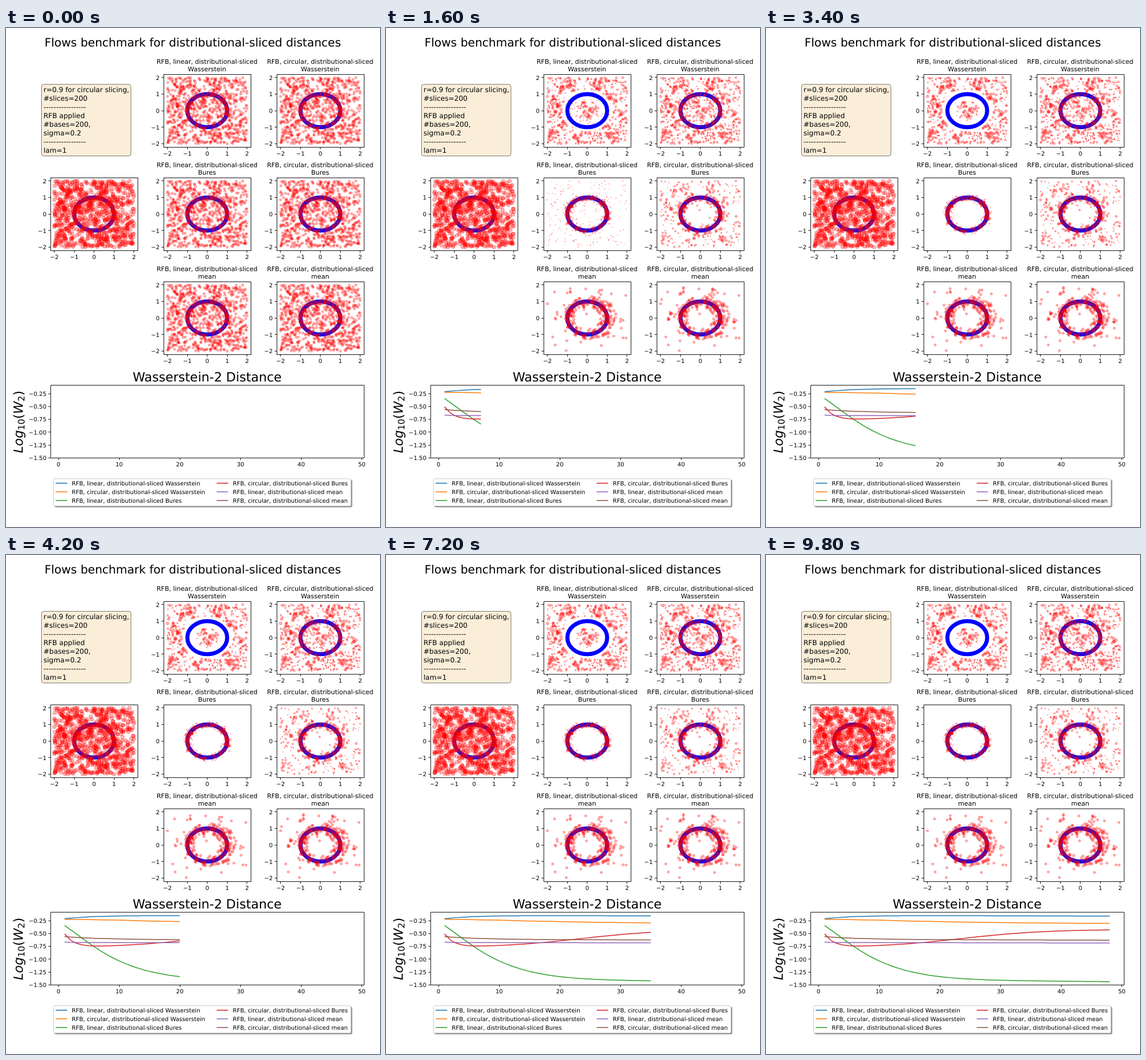
Write an HTML page with a canvas that moves like this. It is 648x864 px and loops after 10000 ms.

```html
<!DOCTYPE html>
<html lang="en">
<head>
<meta charset="utf-8">
<title>Flows benchmark</title>
<style>
html, body { margin: 0; width: 100%; height: 100%; overflow: hidden; background: #fff; }
canvas { display: block; }
</style>
</head>
<body>
<canvas id="stage" width="648" height="864"></canvas>
<script>
const ctx = document.getElementById('stage').getContext('2d');
ctx.textRendering = 'geometricPrecision';
const STEP_MS = 200, STEPS = 50;
const UNIT_X = 34.5, UNIT_Y = 28.7;
const { exp, abs, hypot, sin, cos, PI } = Math;

function seeded(seed) {
  return () => {
    seed = (seed + 0x6D2B79F5) | 0;
    let t = Math.imul(seed ^ (seed >>> 15), 1 | seed);
    t = (t + Math.imul(t ^ (t >>> 7), 61 | t)) ^ t;
    return ((t ^ (t >>> 14)) >>> 0) / 4294967296;
  };
}
const rand = seeded(7);

// gap: distance from the ring; clump: smooth noise that makes groups; pace: how slowly it settles.
const particles = Array.from({ length: 900 }, () => {
  const x = rand() * 4 - 2, y = rand() * 4 - 2;
  return {
    x, y, gap: hypot(x, y) - 1, luck: rand(), pace: 0.2 + 1.8 * rand() ** 3,
    clump: 0.5 + 0.25 * (sin(4.1 * x + 2.7 * y + 1) + sin(5.3 * y - 3.7 * x + 2))
  };
});

// Ring particles gather a little more on the left and right sides.
const ringParticles = Array.from({ length: 150 }, () => {
  const a = rand() * 2 * PI, angle = a - 0.28 * sin(2 * a);
  return { x: cos(angle), y: sin(angle) };
});

// Particles stay around the ring, further out on the right, plus a few distant groups.
const hugRing = groupLevel => p => {
  const reach = 0.3 + 0.16 * p.x / (1 + p.gap);
  if (p.gap > -0.33 && p.gap < reach) return p.luck < 0.92 ? 1.1 : 0;
  const grouped = p.gap > 0 && p.y > -1 && p.clump > groupLevel;
  return p.luck < (grouped ? 0.7 : 0.02) ? 1 : 0;
};

// settle: final particle size; curve: log distance at a step; tau: settling time in steps.
const flows = [
  { kind: 'linear', name: 'Wasserstein', color: '#1f77b4', tau: 5,
    settle: p => {
      if (p.gap > -0.4 && p.gap < 0.28) return 0;
      return p.luck < 0.8 ? 0.3 + p.clump : 0.1;
    },
    curve: s => -0.144 - 0.085 * exp(-s / 5) - 0.0004 * s },
  { kind: 'circular', name: 'Wasserstein', color: '#ff7f0e', tau: 6,
    settle: p => p.luck < 0.72 ? 0.35 + 0.9 * p.clump : 0.1,
    curve: s => -0.225 - 0.095 * s * s / (s * s + 450) },
  { kind: 'linear', name: 'Bures', color: '#2ca02c', tau: 4,
    settle: p => abs(p.gap) < 0.14 ? 1 : abs(p.gap) < 0.26 ? 0.5 * p.luck : 0,
    curve: s => -1.39 - 0.001 * s + 1.1 * exp(-((s / 9.3) ** 1.32)) },
  { kind: 'circular', name: 'Bures', color: '#d62728', tau: 1.5,
    settle: p => {
      if (abs(p.gap) < 0.25) return p.luck < 0.8 ? 1 : 0.2;
      return p.luck < (p.gap < 0 ? 0.12 : 0.4) ? 0.2 + 0.9 * p.clump : 0;
    },
    curve: s => -0.78 + 0.36 / (1 + exp((23.5 - s) / 7)) + 0.5 * exp(-s / 1.5) },
  { kind: 'linear', name: 'mean', color: '#9467bd', tau: 0.8, settle: hugRing(0.88),
    curve: s => -0.676 - 0.0002 * s + 0.02 * exp(-s) },
  { kind: 'circular', name: 'mean', color: '#8c564b', tau: 0.8, settle: hugRing(0.8),
    curve: s => -0.616 - 0.0003 * s + 0.065 * exp(-s / 6) }
];
flows.forEach((flow, i) => {
  flow.label = `RFB, ${flow.kind}, distributional-sliced`;
  flow.left = 273 + 196 * (i % 2);
  flow.top = Math.ceil(79.5 + 179.5 * (i >> 1));
});

function text(str, x, y, size, align = 'left', style = '') {
  ctx.font = `${style} ${size}px "DejaVu Sans", sans-serif`;
  ctx.textAlign = align;
  ctx.fillStyle = '#000';
  ctx.fillText(str, x, y);
}

function line(x0, y0, x1, y1, color, width) {
  ctx.beginPath();
  ctx.moveTo(x0, y0);
  ctx.lineTo(x1, y1);
  ctx.strokeStyle = color;
  ctx.lineWidth = width;
  ctx.stroke();
}

function roundBox(x, y, w, h, r, fill, stroke) {
  ctx.beginPath();
  ctx.roundRect(x, y, w, h, r);
  ctx.fillStyle = fill;
  ctx.fill();
  ctx.strokeStyle = stroke;
  ctx.lineWidth = 1;
  ctx.stroke();
}

const signed = (v, digits = 0) => (v < 0 ? '\u2212' : '') + abs(v).toFixed(digits);
const snap = v => Math.round(v - 0.5) + 0.5;

function frameBox(left, top, width) {
  ctx.strokeStyle = '#000';
  ctx.lineWidth = 0.9;
  ctx.strokeRect(left + 0.5, top + 0.5, width, 126);
}

function tickX(x, bottom, label) {
  line(snap(x), bottom, snap(x), bottom + 4, '#000', 0.9);
  text(label, x, bottom + 14.5, 10, 'center');
}

function tickY(left, y, label) {
  line(left - 3.5, snap(y), left, snap(y), '#000', 0.9);
  text(label, left - 7, y + 3.8, 10, 'right');
}

function dot(x, y, r) {
  ctx.beginPath();
  ctx.arc(x, y, r, 0, 2 * PI);
  ctx.fill();
  ctx.stroke();
}

function scatter(left, top, radius, sizeOf, redRing) {
  const cx = left + 75.7, cy = top + 63.1;
  const place = (p, r) => dot(cx + p.x * UNIT_X, cy - p.y * UNIT_Y, r);

  ctx.beginPath();
  ctx.ellipse(cx, cy, UNIT_X, UNIT_Y, 0, 0, 2 * PI);
  ctx.strokeStyle = '#00f';
  ctx.lineWidth = 7;
  ctx.stroke();

  ctx.fillStyle = ctx.strokeStyle = 'rgba(255,0,0,.3)';
  ctx.lineWidth = 1;
  for (const p of particles) {
    const size = sizeOf(p);
    if (size > 0.12) place(p, radius * size);
  }
  if (redRing) {
    ctx.fillStyle = ctx.strokeStyle = 'rgba(255,0,0,.09)';
    for (const p of ringParticles) place(p, 2.6);
  }

  frameBox(left, top, 151);
  for (let v = -2; v <= 2; v++) {
    tickX(cx + v * UNIT_X, top + 126, signed(v));
    tickY(left, cy - v * UNIT_Y, signed(v));
  }
}

function drawNote() {
  roundBox(61.5, 97.5, 155, 124, 4, '#faeed9', 'rgba(0,0,0,.5)');
  const rule = '-'.repeat(17);
  ['r=0.9 for circular slicing,', '#slices=200', rule, 'RFB applied',
    '#bases=200,', 'sigma=0.2', rule, 'lam=1']
    .forEach((row, i) => text(row, 65, 111.3 + 15 * i, 12));
}

function drawAxisTitle() {
  ctx.save();
  ctx.translate(28.5, 736);
  ctx.rotate(-PI / 2);
  let x = 0;
  const put = (str, size, drop, style) => {
    text(str, x, drop, size, 'left', style);
    x += ctx.measureText(str).width;
  };
  put('Log', 22, 0, 'italic');
  put('10', 15.4, 3.5);
  put('(', 22, 0);
  put('W', 22, 0, 'italic');
  put('2', 15.4, 3.5);
  put(')', 22, 0);
  ctx.restore();
}

function drawChart(lastStep) {
  const toX = v => 91 + 10.51 * v, toY = v => 744.3 - (v + 1.5) * 89;
  text('Wasserstein-2 Distance', 348.5, 611.5, 22, 'center');
  for (const { curve, color } of flows) {
    ctx.beginPath();
    for (let s = 1; s <= lastStep; s++) ctx.lineTo(toX(s), toY(curve(s)));
    ctx.strokeStyle = color;
    ctx.lineWidth = 1.5;
    ctx.lineJoin = 'round';
    ctx.stroke();
  }
  frameBox(77, 618, 543);
  for (let v = 0; v <= 50; v += 10) tickX(toX(v), 744, String(v));
  for (let v = -1.5; v < 0; v += 0.25) tickY(77, toY(v), signed(v, 2));
  drawAxisTitle();
}

function drawLegend() {
  roundBox(84.5, 782.5, 515, 47, 2, '#999', '#999');
  roundBox(82.5, 780.5, 515, 47, 2, '#fff', '#ccc');
  flows.forEach((flow, i) => {
    const x = i < 3 ? 86 : 365, y = 788.2 + 15 * (i % 3);
    line(x, y, x + 20, y, flow.color, 1.5);
    text(`${flow.label} ${flow.name}`, x + 28, y + 3.3, 10);
  });
}

function drawFlow(flow, step) {
  const middle = flow.left + 75.3;
  text(flow.label, middle, flow.top - 18, 11, 'center');
  text(flow.name, middle, flow.top - 5.5, 11, 'center');
  const sizeOf = p => {
    if (step > 0 && flow === flows[0] && abs(p.gap) < 0.12) return 0;
    const end = flow.settle(p);
    return end + (1 - end) * exp(-step / (flow.tau * p.pace));
  };
  scatter(flow.left, flow.top, 2, sizeOf, flow !== flows[0] || step === 0);
}

function draw(step) {
  ctx.fillStyle = '#fff';
  ctx.fillRect(0, 0, 648, 864);
  text('Flows benchmark for distributional-sliced distances', 323.5, 32, 20, 'center');
  drawNote();
  scatter(77, 259, 3.2, () => 1, true);
  for (const flow of flows) drawFlow(flow, step);
  drawChart(step - 1);
  drawLegend();
}

let shown = -1;
function tick() {
  const step = Math.floor(performance.now() / STEP_MS) % STEPS;
  if (step !== shown) draw(shown = step);
  requestAnimationFrame(tick);
}
tick();
</script>
</body>
</html>
```
